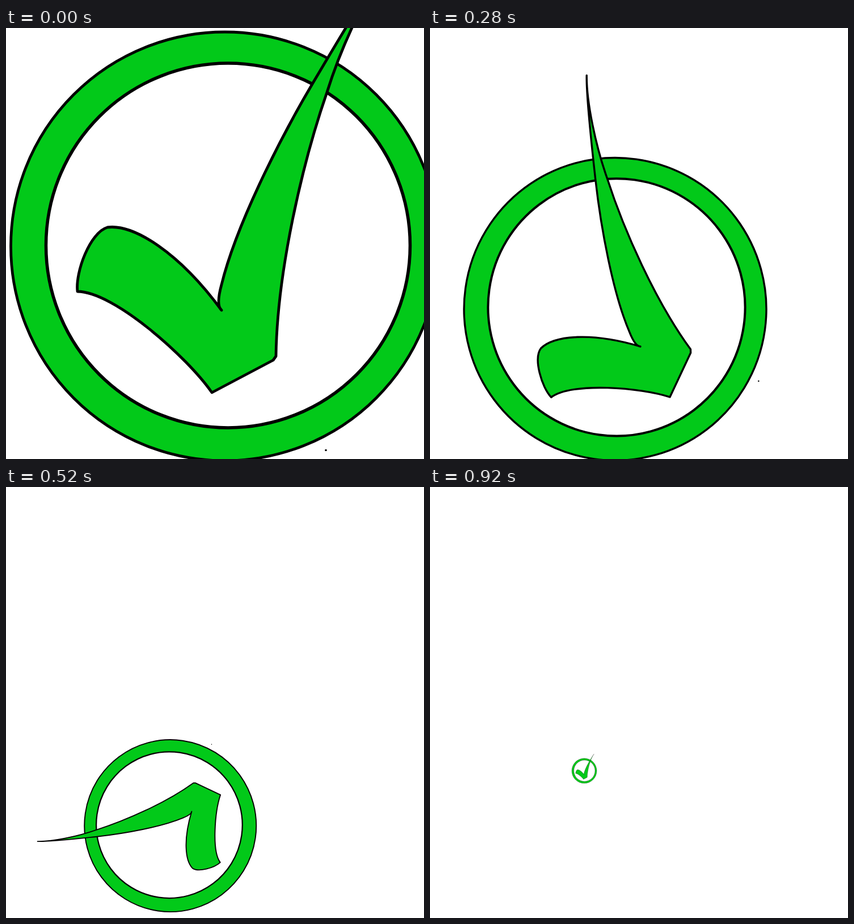
Animation, 737 px wide and 759 px high, one loop 960 ms. Source, as an HTML page:

```html
<!DOCTYPE html>
<html lang="en">
<head>
<meta charset="utf-8">
<title>Spinning check mark</title>
<style>
  html, body { margin: 0; width: 100%; height: 100%; overflow: hidden; background: #fff; }
  svg { display: block; width: 737px; height: 759px; }
  #mark { fill: #02c919; stroke: #000; stroke-width: 4.8; stroke-linejoin: round; }
</style>
</head>
<body>
<svg viewBox="0 0 737 759">
  <g id="mark">
    <circle cx="386" cy="384.5" r="377.5"/>
    <circle cx="391.5" cy="383" r="321" fill="#fff" stroke-width="5.6"/>
    <path d="M363 642 C320 580 190 464 126 464 C122 430 148 360 179 351
      C225 345 305 395 380 497 C372 490 375 470 380 452 C405 350 480 200 541 97
      C575 40 645 -80 680 -124 C640 -72 592 30 566 113 C522 240 478 430 476 578
      L471 585 Z"/>
    <circle id="dot" cx="564" cy="743.5" r="1.8" fill="#000" stroke="none"/>
  </g>
</svg>
<script>
const STEP = 40, STEPS = 24, RADIUS = 377.5;

// step, centre x, centre y, radius, turn in degrees
const keys = [
  [0, 386, 384.5, 377.5, 0],
  [4, 349, 446, 316, 18.2],
  [7, 326.5, 495, 266.5, 37],
  [11, 301, 574.5, 183, 90.3],
  [14, 297, 587.5, 136.5, 147],
  [15, 320, 556, 121, 168.4],
  [19, 310.7, 498.5, 59.2, 264],
  [23, 272, 499.8, 22, 360]
];

const mark = document.getElementById('mark');
const dot = document.getElementById('dot');

const slope = (i, c) => (keys[i + 1][c] - keys[i][c]) / (keys[i + 1][0] - keys[i][0]);

// Tangent of the parabola through neighbouring keys
function tangent(i, c) {
  const last = keys.length - 1;
  if (i === 0) return 2 * slope(0, c) - tangent(1, c);
  if (i === last) return 2 * slope(last - 1, c) - tangent(last - 1, c);
  const before = keys[i][0] - keys[i - 1][0];
  const after = keys[i + 1][0] - keys[i][0];
  return (slope(i - 1, c) * after + slope(i, c) * before) / (before + after);
}

function sample(n, c) {
  let i = 0;
  while (i < keys.length - 2 && n >= keys[i + 1][0]) i++;
  const a = keys[i], b = keys[i + 1];
  const h = b[0] - a[0], u = (n - a[0]) / h, v = 1 - u;
  return a[c] * v * v * (1 + 2 * u) + b[c] * u * u * (3 - 2 * u)
    + h * u * v * (tangent(i, c) * v - tangent(i + 1, c) * u);
}

function draw(time) {
  const n = Math.floor(time / STEP) % STEPS;
  const [x, y, r, turn] = [1, 2, 3, 4].map(c => sample(n, c));
  const scale = r / RADIUS;
  mark.setAttribute('transform',
    `translate(${x} ${y}) rotate(${-turn}) scale(${scale}) translate(-386 -384.5)`);
  dot.setAttribute('visibility', scale > 0.35 ? 'visible' : 'hidden');
}

const start = performance.now();
function tick() {
  draw(performance.now() - start);
  requestAnimationFrame(tick);
}
tick();
</script>
</body>
</html>
```
